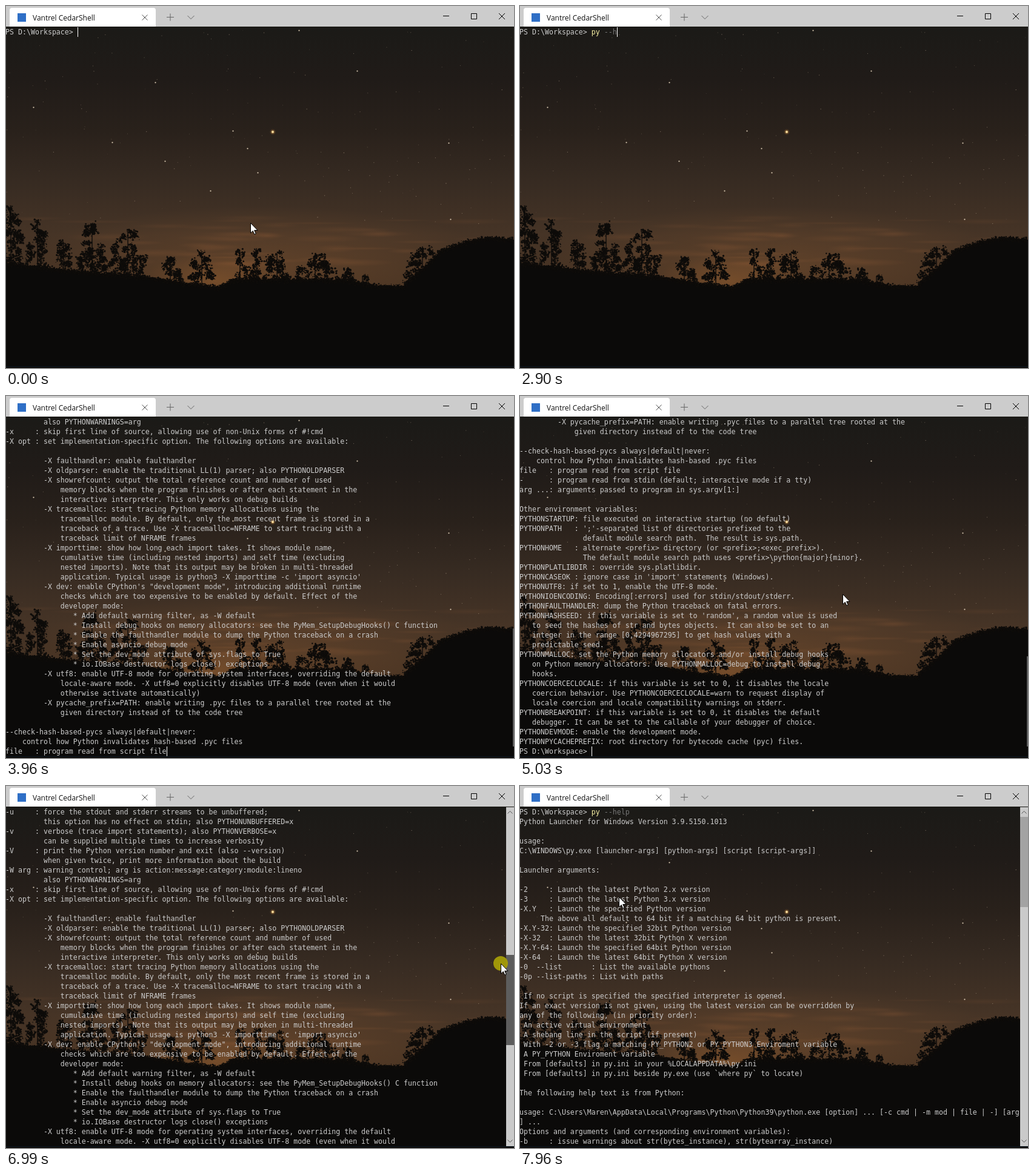
Animation, 838 px wide and 598 px high, one loop 8000 ms. Source, as an HTML page with a canvas:

```html
<!DOCTYPE html>
<html lang="en">
<head>
<meta charset="utf-8">
<title>Terminal</title>
<style>
html, body { margin: 0; width: 100%; height: 100%; overflow: hidden; background: #0b0b0a; }
#stage { position: relative; width: 838px; height: 598px; overflow: hidden; }
#stage > *, #view > *, #bar > *, #pointer > * { position: absolute; }
#sky, #pointer { left: 0; top: 0; }
#view { left: 0; top: 35px; width: 838px; height: 560px; overflow: hidden; }
#text {
  left: -1px; top: 0; margin: 0; width: 840px; overflow: hidden; color: #ccc;
  font: 11.627px/16px "DejaVu Sans Mono", monospace; font-variant-ligatures: none;
}
#text b { font-weight: 400; color: #f9f1a5; }
#text i { font-style: normal; color: #767676; }
#caret { left: 0; top: 0; width: 1px; height: 16px; background: #fff; }
#bar { left: 825px; top: 35px; width: 13px; height: 560px; background: #cacaca; }
#bar svg { left: 0; top: 0; }
#thumb { right: 0; }
#head { left: 0; top: 0; }
#title { left: 44px; top: 11px; font: 12px/17px "Open Sans", "Noto Sans", sans-serif; color: #111; white-space: pre; }
#spot { left: -12px; top: -12px; width: 24px; height: 24px; border-radius: 50%; background: rgba(165,157,8,.95); }
#mouse { left: 0; top: 0; overflow: visible; }
</style>
</head>
<body>
<div id="stage">
<canvas id="sky" width="838" height="598"></canvas>
<div id="view">
<pre id="text">PS D:\Workspace&gt; <b id="cmd"></b><i id="arg"></i>
Python Launcher for Windows Version 3.9.5150.1013

usage:
C:\WINDOWS\py.exe [launcher-args] [python-args] [script [script-args]]

Launcher arguments:

-2     : Launch the latest Python 2.x version
-3     : Launch the latest Python 3.x version
-X.Y   : Launch the specified Python version
     The above all default to 64 bit if a matching 64 bit python is present.
-X.Y-32: Launch the specified 32bit Python version
-X-32  : Launch the latest 32bit Python X version
-X.Y-64: Launch the specified 64bit Python version
-X-64  : Launch the latest 64bit Python X version
-0  --list       : List the available pythons
-0p --list-paths : List with paths

 If no script is specified the specified interpreter is opened.
If an exact version is not given, using the latest version can be overridden by
any of the following, (in priority order):
 An active virtual environment
 A shebang line in the script (if present)
 With -2 or -3 flag a matching PY_PYTHON2 or PY_PYTHON3 Enviroment variable
 A PY_PYTHON Enviroment variable
 From [defaults] in py.ini in your %LOCALAPPDATA%\py.ini
 From [defaults] in py.ini beside py.exe (use `where py` to locate)

The following help text is from Python:

usage: C:\Users\Maren\AppData\Local\Programs\Python\Python39\python.exe [option] ... [-c cmd | -m mod | file | -] [arg
] ...
Options and arguments (and corresponding environment variables):
-b     : issue warnings about str(bytes_instance), str(bytearray_instance)
         and comparing bytes/bytearray with str. (-bb: issue errors)
-B     : don't write .pyc files on import; also PYTHONDONTWRITEBYTECODE=x
-c cmd : program passed in as string (terminates option list)
-d     : turn on parser debugging output (for experts only, only works on
         debug builds); also PYTHONDEBUG=x
-E     : ignore PYTHON* environment variables (such as PYTHONPATH)
-h     : print this help message and exit (also --help)
-i     : inspect interactively after running script; forces a prompt even
         if stdin does not appear to be a terminal; also PYTHONINSPECT=x
-I     : isolate Python from the user's environment (implies -E and -s)
-m mod : run library module as a script (terminates option list)
-O     : remove assert and __debug__-dependent statements; add .opt-1 before
         .pyc extension; also PYTHONOPTIMIZE=x
-OO    : do -O changes and also discard docstrings; add .opt-2 before
         .pyc extension
-q     : don't print version and copyright messages on interactive startup
-s     : don't add user site directory to sys.path; also PYTHONNOUSERSITE
-S     : don't imply 'import site' on initialization
-u     : force the stdout and stderr streams to be unbuffered;
         this option has no effect on stdin; also PYTHONUNBUFFERED=x
-v     : verbose (trace import statements); also PYTHONVERBOSE=x
         can be supplied multiple times to increase verbosity
-V     : print the Python version number and exit (also --version)
         when given twice, print more information about the build
-W arg : warning control; arg is action:message:category:module:lineno
         also PYTHONWARNINGS=arg
-x     : skip first line of source, allowing use of non-Unix forms of #!cmd
-X opt : set implementation-specific option. The following options are available:

         -X faulthandler: enable faulthandler
         -X oldparser: enable the traditional LL(1) parser; also PYTHONOLDPARSER
         -X showrefcount: output the total reference count and number of used
             memory blocks when the program finishes or after each statement in the
             interactive interpreter. This only works on debug builds
         -X tracemalloc: start tracing Python memory allocations using the
             tracemalloc module. By default, only the most recent frame is stored in a
             traceback of a trace. Use -X tracemalloc=NFRAME to start tracing with a
             traceback limit of NFRAME frames
         -X importtime: show how long each import takes. It shows module name,
             cumulative time (including nested imports) and self time (excluding
             nested imports). Note that its output may be broken in multi-threaded
             application. Typical usage is python3 -X importtime -c 'import asyncio'
         -X dev: enable CPython's "development mode", introducing additional runtime
             checks which are too expensive to be enabled by default. Effect of the
             developer mode:
                * Add default warning filter, as -W default
                * Install debug hooks on memory allocators: see the PyMem_SetupDebugHooks() C function
                * Enable the faulthandler module to dump the Python traceback on a crash
                * Enable asyncio debug mode
                * Set the dev_mode attribute of sys.flags to True
                * io.IOBase destructor logs close() exceptions
         -X utf8: enable UTF-8 mode for operating system interfaces, overriding the default
             locale-aware mode. -X utf8=0 explicitly disables UTF-8 mode (even when it would
             otherwise activate automatically)
         -X pycache_prefix=PATH: enable writing .pyc files to a parallel tree rooted at the
             given directory instead of to the code tree

--check-hash-based-pycs always|default|never:
    control how Python invalidates hash-based .pyc files
file   : program read from script file
-      : program read from stdin (default; interactive mode if a tty)
arg ...: arguments passed to program in sys.argv[1:]

Other environment variables:
PYTHONSTARTUP: file executed on interactive startup (no default)
PYTHONPATH   : ';'-separated list of directories prefixed to the
               default module search path.  The result is sys.path.
PYTHONHOME   : alternate &lt;prefix&gt; directory (or &lt;prefix&gt;;&lt;exec_prefix&gt;).
               The default module search path uses &lt;prefix&gt;\python{major}{minor}.
PYTHONPLATLIBDIR : override sys.platlibdir.
PYTHONCASEOK : ignore case in 'import' statements (Windows).
PYTHONUTF8: if set to 1, enable the UTF-8 mode.
PYTHONIOENCODING: Encoding[:errors] used for stdin/stdout/stderr.
PYTHONFAULTHANDLER: dump the Python traceback on fatal errors.
PYTHONHASHSEED: if this variable is set to 'random', a random value is used
   to seed the hashes of str and bytes objects.  It can also be set to an
   integer in the range [0,4294967295] to get hash values with a
   predictable seed.
PYTHONMALLOC: set the Python memory allocators and/or install debug hooks
   on Python memory allocators. Use PYTHONMALLOC=debug to install debug
   hooks.
PYTHONCOERCECLOCALE: if this variable is set to 0, it disables the locale
   coercion behavior. Use PYTHONCOERCECLOCALE=warn to request display of
   locale coercion and locale compatibility warnings on stderr.
PYTHONBREAKPOINT: if this variable is set to 0, it disables the default
   debugger. It can be set to the callable of your debugger of choice.
PYTHONDEVMODE: enable the development mode.
PYTHONPYCACHEPREFIX: root directory for bytecode cache (pyc) files.
PS D:\Workspace&gt; </pre>
<div id="caret"></div>
</div>
<div id="bar">
<svg width="13" height="560" fill="none" stroke="#555"><path d="M2.5 10.5l4-4 4 4M2.5 549.5l4 4 4-4"/></svg>
</div>
<div id="thumb"></div>
<svg id="head" width="838" height="34" fill="none">
  <path fill="#ccc" d="M0 0H838V34H0z"/>
  <path fill="#fff" d="M6 34V7q0-4 4-4H243q4 0 4 4V34z"/>
  <path fill="#2f6fc6" d="M19 12h14v14h-14z"/>
  <path stroke="#555" d="M224.500 14.500l9 9m0-9l-9 9"/>
  <path stroke="#666" d="M265 18.500h12m-6-6v12M299.500 16l5.500 5.500 5.500-5.500"/>
  <path stroke="#000" d="M721 16.500h10M767.500 12.500h9v9h-9zM813 12l10 10m0-10l-10 10"/>
</svg>
<div id="title">Vantrel CedarShell</div>
<div id="pointer">
  <div id="spot"></div>
  <svg id="mouse" width="13" height="20"><path d="M.5.5V17L4.300 13.400 6.800 19.200 9.200 18.200 6.700 12.500H12z" fill="#fff" stroke="#000"/></svg>
</div>
</div>
<script>
const $ = id => document.getElementById(id);
const clamp = (v, lo, hi) => Math.min(hi, Math.max(lo, v));

// ---- night landscape ----
const LEAF = '#0e0c0a';
const g = $('sky').getContext('2d');
let seed = 7;
const rnd = () => (seed = (seed * 16807) % 2147483647) / 2147483647;
const spread = () => rnd() + rnd() + rnd() - 1.5;

function dot(x, y, r, color) {
  g.fillStyle = color;
  g.beginPath();
  g.arc(x, y, r, 0, 7);
  g.fill();
}
function glow(x, y, rx, ry, rgb, alpha) {
  g.save();
  g.translate(x, y);
  g.scale(rx, ry);
  const grad = g.createRadialGradient(0, 0, 0, 0, 0, 1);
  [1, 0.5, 0].forEach((k, i) => grad.addColorStop(i / 2, `rgba(${rgb},${alpha * k})`));
  g.fillStyle = grad;
  g.fillRect(-1, -1, 2, 2);
  g.restore();
}

function drawSky() {
  const grad = g.createLinearGradient(0, 34, 0, 465);
  ['#1b1a17', '#201b18', '#29211b', '#372b22', '#463426', '#443122'].forEach((c, i) => grad.addColorStop(i / 5, c));
  g.fillStyle = grad;
  g.fillRect(0, 34, 838, 564);
  glow(420, 430, 400, 100, '128,84,48', 0.45);
  glow(345, 455, 120, 45, '160,100,48', 0.4);
  for (let i = 0; i < 45; i++) {
    const d = rnd();
    glow(430 + spread() * 330, 350 + d * 80, 25 + rnd() * 55, 2 + rnd() * 5, '140,88,52', 0.12 + d * 0.16);
  }
  const bright = [[579, 107], [262, 256], [246, 126], [175, 225], [483, 40], [733, 352],
    [337, 305], [730, 226], [415, 275], [398, 235], [374, 206], [45, 167]];
  for (const [x, y] of bright) dot(x + 0.5, y + 0.5, 1.1, '#e0d0b8');
  for (let i = 0; i < 150; i++) {
    dot(rnd() * 838, 40 + rnd() * 320, 0.45 + rnd() * 0.25, `rgba(195,175,150,${0.2 + rnd() * 0.4})`);
  }
  glow(440, 208, 5, 5, '220,150,70', 0.7);
  dot(440, 208, 1.9, '#ffdf9e');
}

// a loose clump of leaves
function clump(x, y, size, leaves) {
  for (let i = 0; i < leaves; i++) dot(x + spread() * size, y + spread() * size, 0.6 + rnd() * 1.1, LEAF);
}
function tree(x, top, w) {
  const h = 462 - top;
  g.fillStyle = LEAF;
  g.fillRect(x - 0.7, top + 6, 1.4, h);
  const clumps = w * h / 55;
  for (let i = 0; i < clumps; i++) {
    const v = Math.pow(rnd(), 0.8);
    const reach = w * Math.min(0.9, 0.12 + Math.sqrt(v) * 0.95);
    clump(x + (rnd() * 2 - 1) * reach, top + 4 + v * h, 5.5, 22);
  }
}

function drawLand() {
  const trees = [[8, 325, 22], [52, 350, 20], [95, 386, 19], [142, 355, 26], [201, 366, 37],
    [271, 412, 20], [323, 403, 21], [386, 400, 14], [413, 394, 13], [447, 403, 24],
    [510, 404, 37], [560, 433, 16], [588, 440, 20], [687, 391, 32]];
  for (const t of trees) tree(...t);

  const ridge = [[0, 425], [130, 440], [235, 448], [300, 459], [350, 465], [376, 452], [560, 453],
    [612, 463], [655, 463], [690, 432], [718, 404], [762, 389], [795, 383], [838, 386]];
  g.fillStyle = '#0b0a09';
  g.beginPath();
  g.moveTo(0, 598);
  for (const p of ridge) g.lineTo(...p);
  g.lineTo(838, 598);
  g.fill();
  ridge.slice(1).forEach(([x1, y1], i) => {
    const [x0, y0] = ridge[i];
    for (let x = x0; x < x1; x += 3) clump(x, y0 + (y1 - y0) * (x - x0) / (x1 - x0) + 1, 4, 9);
  });
  g.fillStyle = '#0c1822';
  g.fillRect(0, 595, 838, 1);
}
drawSky();
drawLand();

// ---- timeline ----
const LOOP = 8000, ROWS = 35, ROW = 16, COL = 7, TRACK = 528, TRACK_TOP = 51;
const COMMAND = 'py --help', PROMPT = 17;
const TYPE = 1920, ENTER = 3790, WAKE = 4810, HOVER = 6260, PRESS = 6740, RELEASE = 7600;
const keyTimes = [TYPE, 2050, 2170, 2450, 2610, 2860, 3340, 3420, 3510];
const path = [[0, 403, 358], [WAKE, 403, 358], [5080, 560, 320], [5600, 816, 432], [6050, 834, 485],
  [PRESS, 834, 485], [6990, 816, 294], [7160, 811, 169], [7400, 808, 100], [RELEASE, 808, 100],
  [7880, 240, 195], [LOOP - 40, 163, 183], [LOOP, 163, 183]];
const drag = [[PRESS, 430], [6990, 280], [7160, 128], [7300, TRACK_TOP], [LOOP, TRACK_TOP]];

function tween(rows, t) {
  const i = rows.findIndex(r => r[0] > t);
  const a = rows[i - 1], b = rows[i], k = (t - a[0]) / (b[0] - a[0]);
  return a.slice(1).map((v, j) => v + (b[j + 1] - v) * k);
}

const lines = $('text').textContent.split('\n');

// output arrives in equal bursts, 23 lines every 40 ms
const printed = t => t < ENTER ? 1 : Math.min(lines.length, 3 + 23 * Math.floor((t - ENTER) / 40));

// the caret stays lit while keys and output arrive
function caretLit(t) {
  const idle = Math.max(0, t < TYPE ? t - 20 : t - 3860);
  return Math.floor(idle / 540) % 2 === 0;
}

function render(t) {
  const keys = keyTimes.filter(k => k <= t).length, n = printed(t);
  $('cmd').textContent = COMMAND.slice(0, Math.min(keys, 2));
  $('arg').textContent = COMMAND.slice(2, Math.max(keys, 2));

  let top = Math.max(0, n - ROWS), thumbTop = TRACK_TOP + TRACK * top / n;
  if (t > PRESS) {
    [thumbTop] = tween(drag, t);
    top = Math.max(0, Math.floor((thumbTop - TRACK_TOP) * n / TRACK - 0.2));
  }
  $('text').style.height = n * ROW + 'px';
  $('text').style.transform = `translateY(${-top * ROW}px)`;

  const col = t < ENTER ? PROMPT + keys : lines[n - 1].length;
  $('caret').style.transform = `translate(${col * COL - 1}px,${(n - 1 - top) * ROW}px)`;
  $('caret').style.opacity = +caretLit(t);

  const open = clamp((t - HOVER) / 280, 0, 1);
  $('bar').style.opacity = open;
  Object.assign($('thumb').style, {
    display: n > ROWS ? 'block' : 'none',
    top: thumbTop + 'px',
    height: TRACK * ROWS / n + 'px',
    width: 2 + 11 * open + 'px',
    background: t >= RELEASE ? '#a3a3a3' : '#5d5d5d'
  });

  const [x, y] = tween(path, t).map(Math.round);
  $('pointer').style.display = t >= TYPE && t < WAKE ? 'none' : 'block';
  $('pointer').style.transform = `translate(${x}px,${y}px)`;
  $('spot').style.display = t >= PRESS && t < RELEASE ? 'block' : 'none';
}

const start = performance.now();
function tick() {
  render((performance.now() - start) % LOOP);
  requestAnimationFrame(tick);
}
tick();
</script>
</body>
</html>
```
